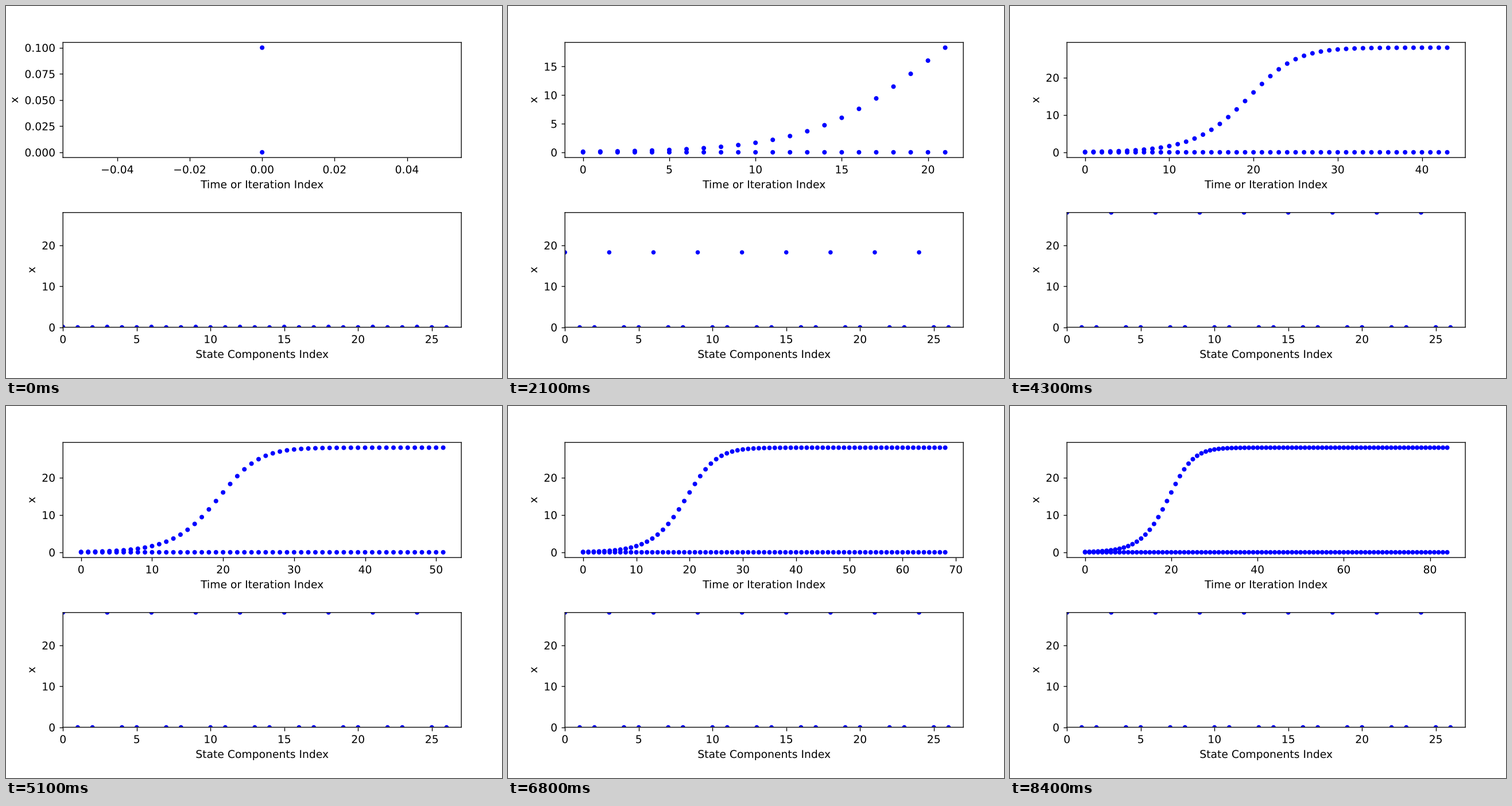
Write a matplotlib script that moves like this. It is 864 px wide and 648 px high and loops after 8500 ms.

```python
import numpy as np
import matplotlib.pyplot as plt
from matplotlib.animation import FuncAnimation
from matplotlib.patheffects import Normal

W, H, DPI = 864, 648, 135
STEPS, INTERVAL = 85, 100
NODES, SPECIES = 9, 3
RATE, CAPACITY = 0.33, 28

# Draw text, lines and dots as paths at their exact subpixel positions.
plt.rcParams.update({
    "path.effects": [Normal()],
    "path.snap": False,
    "text.hinting": "none",
    "axes.linewidth": 0.72,
    "xtick.major.width": 0.72,
    "ytick.major.width": 0.72,
})


def simulate():
    """Discrete logistic growth of the first species in every node."""
    x = np.zeros((STEPS, NODES * SPECIES))
    x[0, ::SPECIES] = 0.1
    for k in range(1, STEPS):
        p = x[k - 1]
        x[k] = p + RATE * p * (1 - p / CAPACITY)
    return x


def panel(top, bottom, xlabel):
    left, right = 99.22, 793.13
    ax = fig.add_axes([left / W, 1 - bottom / H,
                       (right - left) / W, (bottom - top) / H])
    ax.set_xlabel(xlabel)
    ax.set_ylabel("x")
    return ax


states = simulate()
index = np.arange(NODES * SPECIES)

fig = plt.figure(figsize=(W / DPI, H / DPI), dpi=DPI)
history = panel(63.45, 263.93, "Time or Iteration Index")
current = panel(359.78, 559.58, "State Components Index")
current.set_xlim(0, NODES * SPECIES)
current.set_ylim(0, CAPACITY)

# All nodes evolve alike, so one growing and one empty track show them all.
tracks = history.plot([[0, 0]], states[:1, :2], "b.", markersize=6.5)
dots, = current.plot(index, states[0], "b.")


def draw(k):
    for track, values in zip(tracks, states.T):
        track.set_data(np.arange(k + 1), values[:k + 1])
    history.relim()
    history.autoscale()
    dots.set_ydata(states[k])
    return [*tracks, dots]


anim = FuncAnimation(fig, draw, frames=STEPS, interval=INTERVAL,
                     init_func=lambda: draw(0), repeat=True, repeat_delay=0)
plt.show()
```
